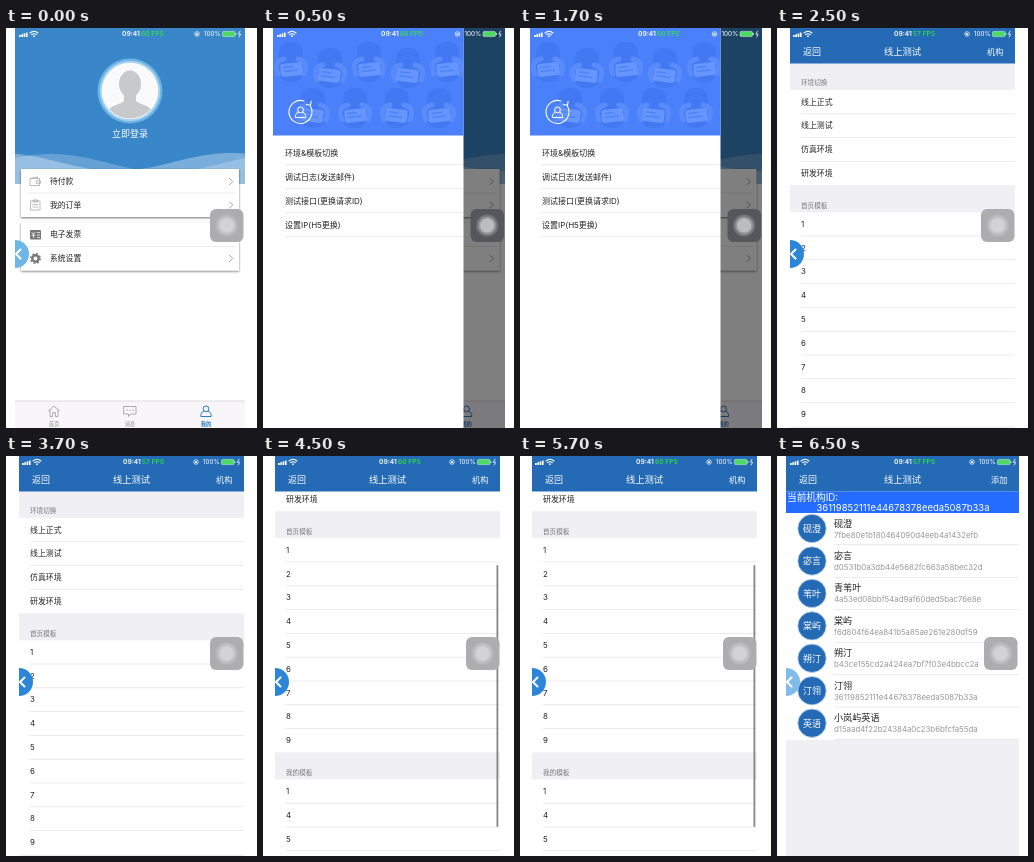
Recreate the animation shown at these times as an HTML page. Size 251x400 px, loop 8 s.

```html
<!DOCTYPE html>
<html lang="zh-CN">
<head>
<meta charset="utf-8">
<title>App demo</title>
<style>
html, body { margin: 0; width: 100%; height: 100%; overflow: hidden; background: #fff; }
svg { display: block; width: 251px; height: 400px; }
text { font-family: Inter, "Noto Sans CJK SC", "Noto Sans CJK", sans-serif; white-space: pre; }
</style>
</head>
<body>
<svg id="stage" viewBox="0 0 251 400" xmlns="http://www.w3.org/2000/svg"></svg>
<script>
const BLUE = '#246ab5', GRAY = '#efeff4', INK = '#222', LINE = '#dedee2';

const rect = (x, y, w, h, fill, extra = '') =>
  `<rect x="${x}" y="${y}" width="${w}" height="${h}" fill="${fill}" ${extra}/>`;
const circle = (x, y, r, fill, extra = '') =>
  `<circle cx="${x}" cy="${y}" r="${r}" fill="${fill}" ${extra}/>`;
const path = (d, stroke, w = 1, fill = 'none') =>
  `<path d="${d}" stroke="${stroke}" stroke-width="${w}" fill="${fill}" stroke-linecap="round" stroke-linejoin="round"/>`;
// y is the vertical middle of the glyphs
const text = (x, y, s, size, fill = INK, anchor = 'start', weight = 400) =>
  `<text x="${x}" y="${y + size * 0.37}" font-size="${size}" fill="${fill}" text-anchor="${anchor}" font-weight="${weight}">${s}</text>`;
const hline = (x1, x2, y, c = LINE) => rect(x1, y - 0.3, x2 - x1, 0.6, c);
const move = (x, y, s) => `<g transform="translate(${x} ${y})">${s}</g>`;
const clip = (id, x, y, w, h, s) =>
  `<clipPath id="${id}">${rect(x, y, w, h, '#000')}</clipPath><g clip-path="url(#${id})">${s}</g>`;

function statusBar(left, timeX, right, fps) {
  let s = '';
  for (let i = 0; i < 4; i++) s += rect(left + i * 2.3, 7 - i * 0.8, 1.7, 2 + i * 0.8, '#fff');
  s += path(`M${left + 11} 5q4 -3.4 8 0M${left + 12.6} 6.7q2.4 -2 4.8 0`, '#fff', 1.1);
  s += circle(left + 15, 8.2, 0.9, '#fff');
  s += text(timeX, 6, '09:41', 6.7, '#fff', 'start', 600);
  s += text(timeX + 19, 6, fps + ' FPS', 6.7, '#2fe832', 'start', 500);
  s += circle(right - 43, 6, 2.3, 'none', 'stroke="#fff" stroke-width=".7"') + rect(right - 44, 5.3, 2, 1.8, '#fff');
  s += text(right - 36, 6, '100%', 6.3, '#fff');
  s += rect(right - 17.5, 3.4, 12.5, 5.2, '#4cd964', 'rx="1.2" stroke="#d8f5dc" stroke-width=".5"');
  s += rect(right - 4.6, 5, 0.9, 2, '#d8f5dc');
  return s + path(`M${right} 3.2l-1.6 3h2.2l-1.4 2.8`, '#fff', 0.8);
}

const LIGHT = ['#adadb0', '#b9b9bc', '#c5c5c8', '#d3d3d6'];
const DARK = ['#56575c', '#747579', '#96979a', '#bcbdc0'];
const touch = (x, [base, ...rings]) => rect(x, 181, 33.5, 33, base, 'rx="6"') +
  rings.map((c, i) => circle(x + 16.7, 197.5, 11 - i * 2, c)).join('');

const bubble = (x, fill) =>
  `<path d="M${x} 212a14 14 0 0 1 0 28z" fill="${fill}"/>` +
  path(`M${x + 5.5} 221.5l-4.5 4.5l4.5 4.5`, '#fff', 2);

const wallet = path('M-5 -3h9v7h-9zM-5 -3l7 -1.6v1.6M1 -.6h4v2.4h-4z', '#aaa', 0.8);
const order = path('M-4.5 -4h9v9h-9zM-2 -5h4v2h-4zM-2.5 -.5h5M-2.5 2h5', '#aaa', 0.8);
const invoice = rect(-5.5, -4.5, 11, 9.5, '#777', 'rx="1"') +
  path('M-3.5 -2l1.5 2l1.5 -2M-3.5 .8h3M-2 0v3M2 -2h2M2 .5h2M2 3h2', '#fff', 0.8);
const gear = circle(0, 0, 3.2, 'none', 'stroke="#777" stroke-width="2.4"') +
  circle(0, 0, 4.8, 'none', 'stroke="#777" stroke-width="1.4" stroke-dasharray="1.9 1.87"');
const person = c => circle(0, -2.6, 2.9, 'none', `stroke="${c}" stroke-width="1"`) +
  path('M-2.2 -.4c-2.5 1.2 -3 2.5 -3 5.4h10.4c0 -2.9 -.5 -4.2 -3 -5.4', c, 1);

// a hill-shaped layer whose crest sits at crestX
function wave(crestX, mid, height, opacity) {
  let d = 'M9 156';
  for (let x = 9; x <= 239; x += 5)
    d += `L${x} ${(mid - height * Math.cos((x - crestX) / 230 * 2 * Math.PI)).toFixed(1)}`;
  return `<path d="${d}L239 156z" fill="#fff" opacity="${opacity}"/>`;
}

function home(crests) {
  let s = rect(9, 0, 230, 400, '#fff') + rect(9, 0, 230, 156, '#3986c9');
  s += wave(crests[0], 135, 9, 0.22) + wave(crests[1], 134, 9, 0.32);
  s += circle(124, 63, 32.5, '#6cb2e4') + circle(124, 63, 30.3, '#a5d2f0') + circle(124, 63, 28.3, '#fafafa');
  s += '<clipPath id="face"><circle cx="124" cy="63" r="27.5"/></clipPath><g clip-path="url(#face)" fill="#c8c9cb">' +
    '<ellipse cx="124" cy="56" rx="11" ry="13.5"/><path d="M118 64h12v9c4 4 15 4 17 12v8h-46v-8c2 -8 13 -8 17 -12z"/></g>';
  s += text(124, 105.5, '立即登录', 9, '#fff', 'middle');
  for (const y of [141, 194.5])
    s += rect(15, y, 218, 48, '#fff', 'filter="url(#shadow)"') + hline(21, 229, y + 24);
  const items = [[153.5, '待付款', wallet], [177, '我的订单', order], [206.5, '电子发票', invoice], [230.5, '系统设置', gear]];
  for (const [y, label, icon] of items)
    s += move(29.5, y, icon) + text(44, y, label, 7.8) + path(`M223.5 ${y - 3.2}l3.2 3.2l-3.2 3.2`, '#999', 0.9);
  s += rect(9, 373, 230, 27, '#f8f6f9') + hline(9, 239, 373, '#c5c5c9');
  s += path('M42.5 383l5.5 -5l5.5 5M44 382v6.5h2.6v-4h2.8v4h2.6v-6.5', '#999', 0.8);
  s += path('M118 378.5h12v7.5h-5l-2.5 2.5v-2.5h-4.5z', '#999', 0.8) + path('M121 382.2h.1M124 382.2h.1M127 382.2h.1', '#999', 1.2);
  s += move(200, 383.5, person('#2b7cc4'));
  return s + text(48, 395.7, '首页', 5.3, '#888', 'middle') + text(124, 395.7, '消息', 5.3, '#888', 'middle') +
    text(200, 395.7, '我的', 5.3, '#2b7cc4', 'middle', 600);
}

// faint figures holding cards
function figures() {
  let s = '';
  for (let i = 0; i < 9; i++) {
    const low = i > 4, x = low ? 50 + (i - 5) * 42 : 28 + i * 39, y = low ? 82 : 36 + (i % 2) * 6;
    s += rect(x - 12, y - 22, 24, 40, '#3f73ec', 'rx="10"') +
      path(`M${x - 13} ${y + 10}q-5 -13 6 -15M${x + 13} ${y + 10}q5 -13 -6 -15`, '#6594fa', 5) +
      `<g transform="rotate(${i % 2 ? 7 : -6} ${x} ${y})">${rect(x - 11, y - 1, 22, 13, '#79a3ff', 'rx="2"')}` +
      `${rect(x - 8, y + 2, 10, 1.5, '#5288f8')}${rect(x - 8, y + 6, 14, 1.5, '#5288f8')}</g>`;
  }
  return `<g opacity=".6">${s}</g>`;
}

function drawer() {
  let s = move(3.5, 0, home([10, 120])) + rect(10, 0, 232, 400, '#000', 'opacity=".5"');
  s += rect(10, 0, 190.5, 400, '#fff') + rect(10, 0, 190.5, 107.5, '#4a80fa');
  s += clip('panel', 10, 12, 190.5, 95.5, figures());
  s += path('M47 77.5A11.5 11.5 0 1 1 41 73M43.5 76.5l4 .8l.6 -4', '#fff', 1.1);
  s += move(37.5, 84.5, person('#fff'));
  ['环境&amp;模板切换', '调试日志(发送邮件)', '测试接口(更换请求ID)', '设置IP(H5更换)'].forEach((label, i) => {
    const y = 125 + i * 23.9;
    s += text(22, y, label, 8) + hline(22, 200, y + 11.8);
  });
  return s + statusBar(14, 118, 237.5, 60) + touch(207.5, DARK);
}

const nav = (x, w, mid, right) => rect(x, 0, w, 35.5, BLUE) +
  text(x + 13, 23.5, '返回', 9, '#fff') + text(mid, 23.5, '线上测试', 9.3, '#fff', 'middle') +
  text(x + w - 11.5, 23.5, right, 8.2, '#fff', 'end');

const sections = [
  ['环境切换', ['线上正式', '线上测试', '仿真环境', '研发环境']],
  ['首页模板', [1, 2, 3, 4, 5, 6, 7, 8, 9]],
  ['我的模板', [1, 4, 5, 6]]
];

function settings(x, scroll, fps) {
  let s = rect(x, 0, 225, 400, '#fff'), y = 35 - scroll;
  for (const [title, rows] of sections) {
    s += rect(x, y, 225, 27, GRAY) + text(x + 11, y + 20, title, 6.6, '#77777c');
    y += 27;
    rows.forEach((row, i) => {
      s += text(x + 11, y + 11.7, row, 7.9);
      y += 23.8;
      if (i < rows.length - 1) s += hline(x + 11, x + 225, y);
    });
  }
  if (scroll) s += rect(x + 221.5, 109, 1.8, 262, '#858587', 'rx=".9"');
  return s + nav(x, 225, x + 112.5, '机构') + statusBar(x + 3, x + 104, x + 220, fps) +
    touch(x + 191, LIGHT) + bubble(x, '#2b86d9');
}

const current = '36119852111e44678378eeda5087b33a';
const orgs = [
  ['砚澄', '7fbe80e1b180464090d4eeb4a1432efb'],
  ['宓言', 'd0531b0a3db44e5682fc663a58bec32d'],
  ['青苇叶', '4a53ed08bbf54ad9af60ded5bac76e8e'],
  ['棠屿', 'f6d804f64ea841b5a85ae261e280df59'],
  ['朔汀', 'b43ce155cd2a424ea7bf7f03e4bbcc2a'],
  ['汀翎', current],
  ['小岚屿英语', 'd15aad4f22b24384a0c23b6bfcfa55da']
];

function orgList() {
  let s = rect(9, 0, 233, 400, GRAY) + rect(9, 57, 233, 227, '#fff');
  s += nav(9, 233, 125.5, '添加') + rect(9, 35.5, 233, 21.5, '#246cff');
  s += text(10, 41, '当前机构ID:', 9.7, '#fff') + text(126, 51.3, current, 9.45, '#fff', 'middle');
  orgs.forEach(([name, id], i) => {
    const y = 72.5 + i * 32.45;
    s += circle(35, y, 14.2, BLUE, 'stroke="#c3d9ee" stroke-width=".8"') + text(35, y, name.slice(-2), 9, '#fff', 'middle');
    s += text(57, y - 5.3, name, 9.1) + text(57, y + 6.2, id, 7.83, '#98989c') + hline(57, 242, y + 16.3);
  });
  return s + statusBar(13, 117, 238, 57) + touch(207, LIGHT) + bubble(9, '#7fbce8');
}

const defs = `<defs><filter id="shadow" x="-5%" y="-10%" width="110%" height="130%">
<feDropShadow dx="0" dy="1" stdDeviation="1.2" flood-opacity=".55"/></filter></defs>`;

const scenes = [
  [0, home([45, 225]) + statusBar(13, 116, 234, 60) + touch(204, LIGHT) + bubble(9, '#6db6e8')],
  [500, clip('c1', 10, 0, 232, 400, drawer())],
  [2500, clip('c2', 13, 0, 225, 400, settings(13, 0, 57))],
  [4500, clip('c3', 12, 0, 225, 400, settings(12, 102, 60))],
  [6500, clip('c4', 9, 0, 233, 400, orgList())]
];

const stage = document.getElementById('stage');
stage.innerHTML = defs + scenes.map(([, s]) => `<g class="scene" opacity="0">${s}</g>`).join('');
const groups = stage.querySelectorAll('.scene');

function draw() {
  const t = performance.now() % 8000;
  const now = scenes.filter(([start]) => start <= t).length - 1;
  groups.forEach((g, i) => g.setAttribute('opacity', i === now ? 1 : 0));
  requestAnimationFrame(draw);
}
draw();
</script>
</body>
</html>
```
